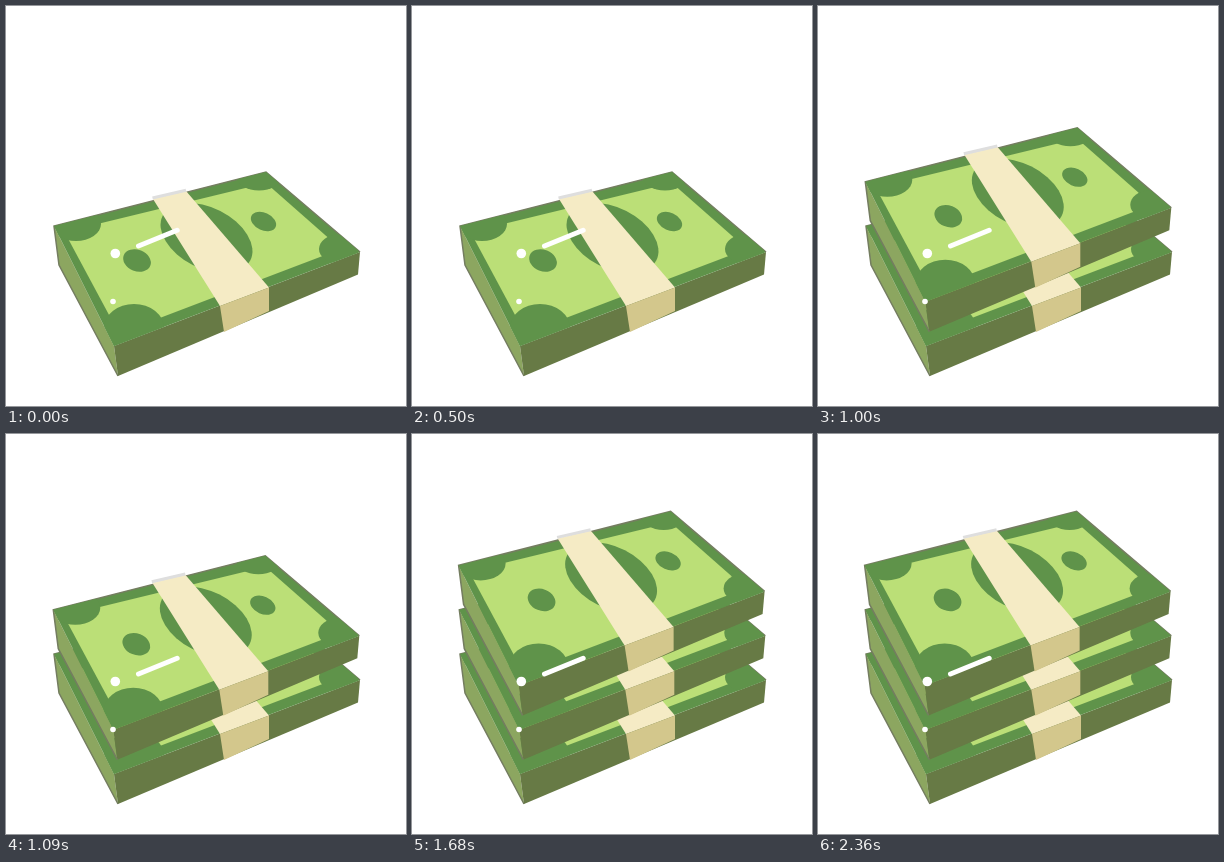
An HTML page for the animation above (2.4 s loop, 400 px wide and 400 px high).

```html
<!DOCTYPE html>
<html lang="en">
<head>
<meta charset="utf-8">
<title>Cash stack</title>
<style>
html, body { margin: 0; height: 100%; overflow: hidden; background: #fff; }
svg { display: block; width: 100vw; height: 100vh; }
</style>
</head>
<body>
<svg viewBox="0 0 400 400">
  <defs>
    <path id="top" d="M48 220 260 166 354 246 108 340z"/>
    <clipPath id="topClip"><use href="#top"/></clipPath>
    <g id="bundle">
      <path fill="#8ca660" d="M48 220 108 340 112 370 53 259z"/>
      <path fill="#677a45" d="M108 340 354 246 352 268.5 112 370z"/>
      <use href="#top" fill="#5f934a"/>
      <path fill="none" stroke="#747d60" stroke-width="1.5" d="M112 370 53 259 48 220 260 166 354 246"/>
      <path fill="#bbdf77" d="M58.5 226 260 177 335 243 113 327.500z"/>
      <g clip-path="url(#topClip)" fill="#5f934a">
        <ellipse cx="70" cy="218" rx="25" ry="17"/>
        <ellipse cx="253" cy="171.5" rx="22" ry="13"/>
        <ellipse cx="333" cy="243" rx="20" ry="14.5"/>
        <ellipse cx="128" cy="322" rx="30" ry="24"/>
        <ellipse rx="14.3" ry="10.7" transform="translate(131 254.5) rotate(22)"/>
        <ellipse rx="13.3" ry="8.7" transform="translate(257.5 215.5) rotate(24)"/>
        <ellipse rx="49.2" ry="30.4" transform="translate(200.5 232) rotate(27)"/>
      </g>
      <path fill="#f5ebc5" d="M147 193 180 185 263 281.5 214 300z"/>
      <path fill="#d3c78c" d="M214 300 263 281.5V305L218 326z"/>
      <path stroke="#dedede" stroke-width="3" d="M146.5 192 180 184.300"/>
    </g>
  </defs>
  <use class="layer" href="#bundle"/>
  <use class="layer" href="#bundle" x="-.7" y="-44.3"/>
  <use class="layer" href="#bundle" x="-1.4" y="-88.6"/>
  <g fill="#fff">
    <circle cx="109.3" cy="247.5" r="4.800"/>
    <circle cx="107" cy="295.5" r="2.800"/>
    <path stroke="#fff" stroke-width="5" stroke-linecap="round" d="M132.500 240 171.200 224.300"/>
  </g>
</svg>
<script>
const LOOP = 2400, STEP = 590;
const layers = document.querySelectorAll('.layer');
const start = performance.now();

function draw() {
  const time = (performance.now() - start) % LOOP;
  layers.forEach((layer, i) => {
    layer.style.display = time >= i * STEP ? '' : 'none';
  });
  requestAnimationFrame(draw);
}
draw();
</script>
</body>
</html>
```
